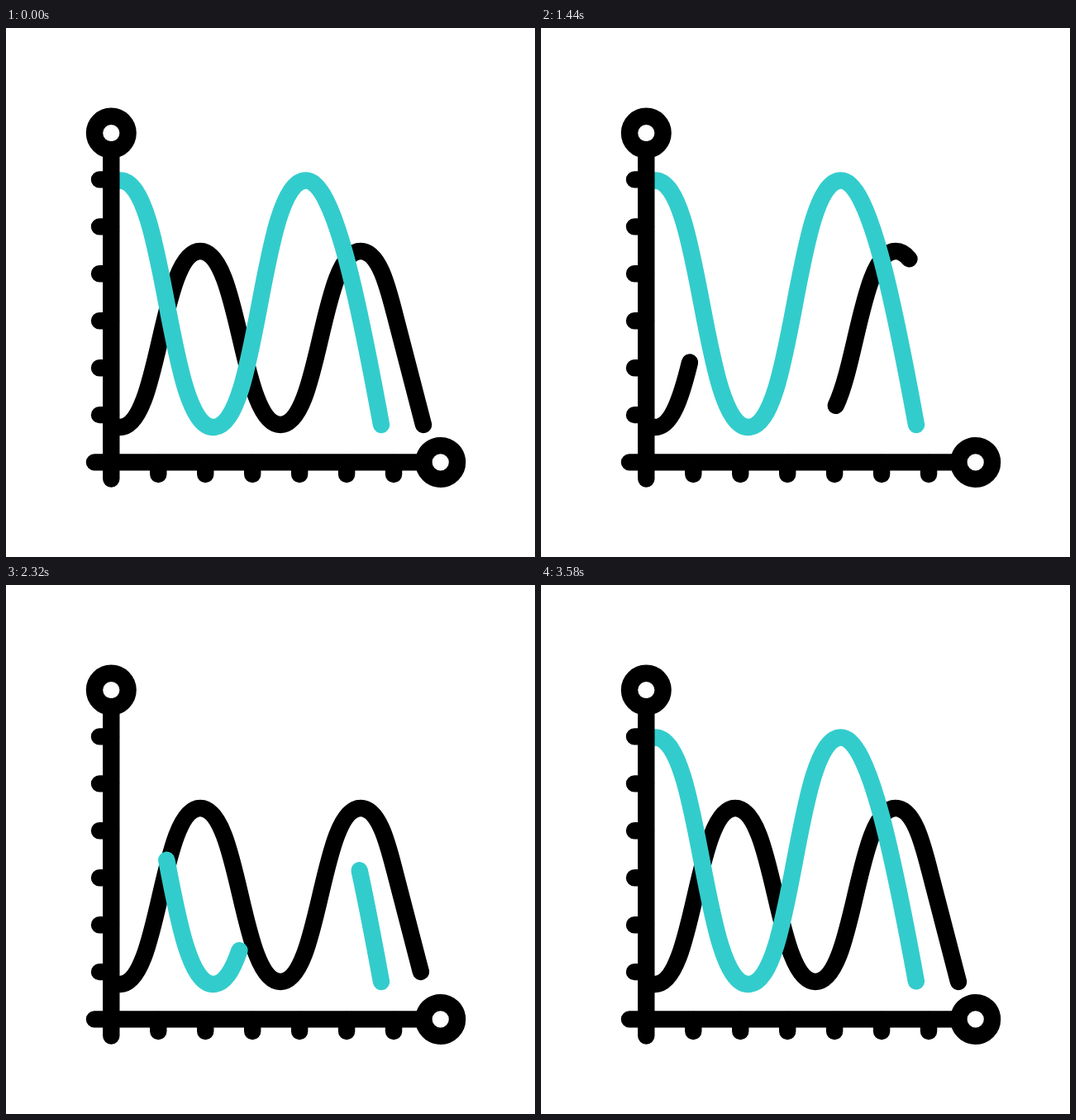
Animation, 640 px wide and 640 px high, one loop 3620 ms. Source, as an HTML page:

```html
<!DOCTYPE html>
<html lang="en">
<head>
<meta charset="utf-8">
<title>Wave chart</title>
<style>
  html, body { margin: 0; width: 100%; height: 100%; overflow: hidden; background: #fff; }
  svg { display: block; width: 100vw; height: 100vh; }
  path, circle { fill: none; stroke-width: 20.4; stroke-linecap: round; stroke-linejoin: round; }
</style>
</head>
<body>
<svg viewBox="0 0 640 640">
  <g id="waves"></g>
  <g id="axes" stroke="#000">
    <path d="M127.3 147V545.6M107 525.4H505"/>
    <circle cx="127.3" cy="127.1" r="20.3"/>
    <circle cx="525.7" cy="525.4" r="20.3"/>
  </g>
</svg>
<script>
const LOOP = 3620, SPAN = 1200;
const NS = 'http://www.w3.org/2000/svg';

function addPath(parent, d, color) {
  const p = document.createElementNS(NS, 'path');
  p.setAttribute('d', d);
  p.setAttribute('stroke', color);
  document.getElementById(parent).appendChild(p);
  return p;
}

let ticks = '';
for (let i = 0; i < 6; i++) {
  ticks += `M113 ${183.4 + i * 56.95}H127M${184.3 + i * 56.95} 540V526`;
}
addPath('axes', ticks, '#000');

// Each wave is three strokes: the one leaving, the one passing, the one staying.
function makeWave(d, color, start) {
  const parts = [0, 1, 2].map(() => addPath('waves', d, color));
  return { parts, start, len: parts[0].getTotalLength() };
}

const waves = [
  makeWave('M133 483H138C186.5 483 186.5 270 235 270C283.5 270 283.5 480 332 480' +
    'C380.5 480 380.5 270 429 270C451 270 461.5 312 470 345L505 480', '#000', 203),
  makeWave('M132 184.5H138C194.5 184.5 194.5 483 251 483C307 483 307 184.5 363 184.5' +
    'C397 184.5 426.5 330 454 480', '#33cccc', 1403)
];

function ease(t, start) {
  const u = Math.min(1, Math.max(0, (t - start) / SPAN));
  return u * u * (3 - 2 * u);
}

function showPart(path, from, to) {
  const size = to - from;
  path.style.display = size > 0.01 ? '' : 'none';
  path.style.strokeDasharray = `${size} 9999`;
  path.style.strokeDashoffset = -from;
}

function draw(t) {
  for (const { parts, start, len } of waves) {
    const at = delay => len * ease(t, start + delay);
    showPart(parts[0], at(0), len);
    showPart(parts[1], at(600), at(400));
    showPart(parts[2], 0, at(1000));
  }
}

const begin = performance.now();
function tick() {
  draw((performance.now() - begin) % LOOP);
  requestAnimationFrame(tick);
}
tick();
</script>
</body>
</html>
```
